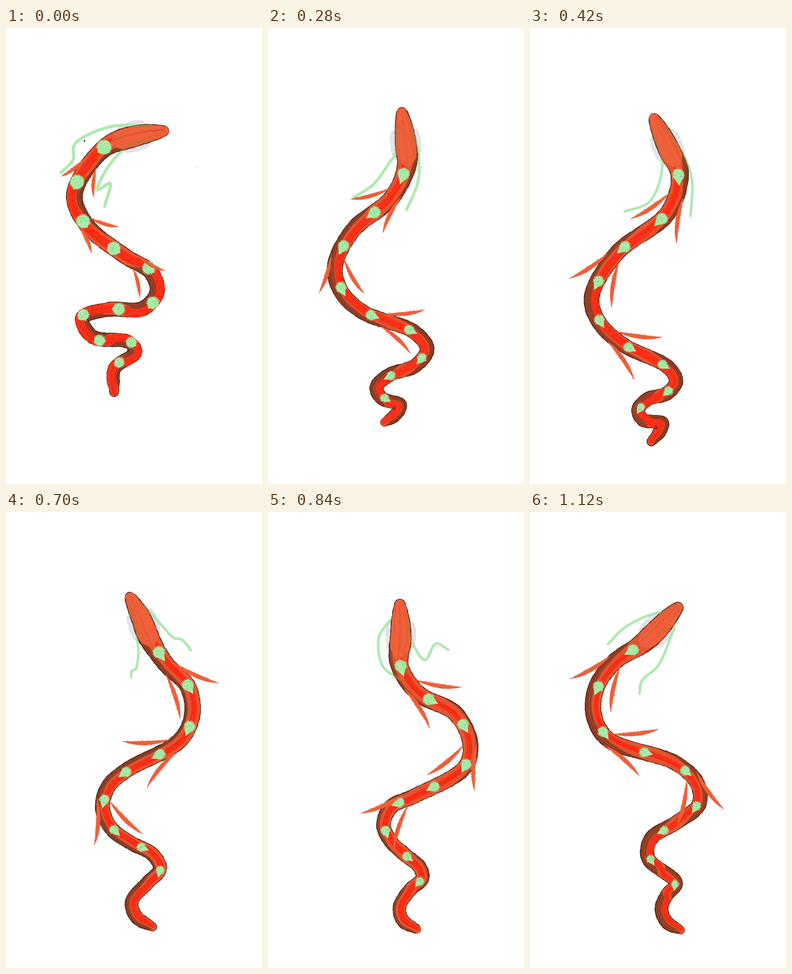
These frames come from a looping animation (561 by 998 pixels, 1.26 s). An HTML page with a canvas:

```html
<!DOCTYPE html>
<html lang="en">
<head>
<meta charset="utf-8">
<title>Swimming dragon</title>
<style>
html, body { margin: 0; width: 100%; height: 100%; overflow: hidden; background: #fff; }
canvas { display: block; width: 100vw; height: 100vh; }
</style>
</head>
<body>
<canvas id="stage" width="561" height="998"></canvas>
<script>
const W = 561, H = 998, HOLD = 140, GRAIN = 3, TAU = Math.PI * 2;
const RED = '#ff2b14', SKIN = '#e6552f', HEAD = '#f05f39', BROWN = '#8d3a20', DARK = '#2b110a';
const MINT = '#a9edaa', GILL = '#e3e4ea', OLIVE = '#a87a3c';

let seed = 1;
const rnd = () => (seed = (seed * 16807) % 2147483647) / 2147483647;
const jit = a => (rnd() * 2 - 1) * a;
const clamp = (v, lo, hi) => Math.max(lo, Math.min(hi, v));
const lerp = (a, b, k) => Array.isArray(a) ? a.map((v, i) => lerp(v, b[i], k)) : a + (b - a) * k;
const pairs = flat => Array.from({ length: flat.length / 2 }, (_, i) => flat.slice(2 * i, 2 * i + 2));
const dist = (a, b) => Math.hypot(a[0] - b[0], a[1] - b[1]);

// Centripetal Catmull-Rom through the key points.
function spline(keys, steps = 40) {
  const n = keys.length, out = [];
  const pts = [lerp(keys[1], keys[0], 2), ...keys, lerp(keys[n - 2], keys[n - 1], 2)];
  for (let i = 0; i < n - 1; i++) {
    const [a, b, c, d] = pts.slice(i, i + 4);
    const p = Math.sqrt(dist(a, b)), q = p + Math.sqrt(dist(b, c)), r = q + Math.sqrt(dist(c, d));
    for (let j = 0; j < steps; j++) {
      const t = p + (q - p) * j / steps;
      const e = lerp(a, b, t / p), f = lerp(b, c, (t - p) / (q - p)), g = lerp(c, d, (t - q) / (r - q));
      out.push(lerp(lerp(e, f, t / q), lerp(f, g, (t - p) / (r - p)), (t - p) / (q - p)));
    }
  }
  return [...out, keys[n - 1]];
}

// Points at equal distances along a curve.
function even(curve, count) {
  const run = [0];
  for (let i = 1; i < curve.length; i++) run.push(run[i - 1] + dist(curve[i - 1], curve[i]));
  const total = run[run.length - 1];
  count = count || Math.round(total / GRAIN);
  let i = 1;
  return Array.from({ length: count + 1 }, (_, k) => {
    const d = total * k / count;
    while (i < run.length - 1 && run[i] < d) i++;
    return lerp(curve[i - 1], curve[i], (d - run[i - 1]) / (run[i] - run[i - 1]));
  });
}

function girth(d, total) {
  const tip = Math.min(1, .5 + .5 * Math.sqrt(d / 40));
  const tail = Math.min(1, .7 + .3 * (total - d) / 25);
  return (19 - 5 * d / total + 5 * Math.exp(-(((d - 85) / 45) ** 2))) * tip * tail;
}

// Shade is the depth of the dark band; its sign picks the side, by the bend of the body.
function trace({ spine, bend, side }) {
  const pts = even(spline(spine)), last = pts.length - 1;
  const dir = (k, reach) => {
    const a = pts[clamp(k - reach, 0, last)], b = pts[clamp(k + reach, 0, last)];
    return Math.atan2(b[1] - a[1], b[0] - a[0]);
  };
  return pts.map(([x, y], k) => {
    const d = k * GRAIN, angle = dir(k, 3);
    const turn = Math.sin(dir(clamp(k + 12, 0, last), 4) - dir(clamp(k - 12, 0, last), 4));
    const shade = clamp(side + bend * clamp(turn * 1.3, -1, 1), -.65, .65) * clamp((d - 40) / 60, 0, 1);
    return { x, y, d, angle, shade, stripe: -.9 * shade, w: girth(d, last * GRAIN),
      nx: -Math.sin(angle), ny: Math.cos(angle) };
  });
}
const at = (p, off) => [p.x + p.nx * p.w * off, p.y + p.ny * p.w * off];
const along = (s, d) => s[clamp(Math.round(d / GRAIN), 0, s.length - 1)];

function pose(spine, whiskers, look) {
  return {
    bend: -.45, side: .08, stripe: .36, gap: 200, fin: 104, spots: 9, reach: .87, size: 13, tail: 1.9, hair: 5, specks: [],
    ...look, spine: pairs(spine), whiskers: whiskers.map(pairs)
  };
}

// In-between pose: keys blended, the head lifted, the tail left in place.
function between(a, b, k, rise, spine) {
  const up = (p, amount) => [p[0], p[1] - amount];
  const mid = spine ? pairs(spine)
    : lerp(a.spine, b.spine, k).map((p, i, all) => up(p, rise * (1 - i / all.length) ** 2));
  const whiskers = a.whiskers.map((w, i) =>
    lerp(even(spline(w), 8), even(spline(b.whiskers[i]), 8), k).map(p => up(p, rise * .7)));
  const look = {};
  for (const key of ['bend', 'side', 'stripe', 'gap', 'fin', 'reach', 'size', 'hair']) look[key] = lerp(a[key], b[key], k);
  return { ...b, ...look, spine: mid, whiskers };
}

const right = pose(
  [348,225, 285,236, 220,260, 162,330, 150,375, 180,435, 262,500, 318,535, 331,578, 300,614,
    225,616, 167,635, 190,676, 268,687, 284,709, 238,745, 237,797],
  [[225,217, 150,255, 147,288, 120,317], [270,258, 225,302, 201,354, 228,340, 216,391]],
  { bend: .45, side: .05, stripe: .55, gap: 145, fin: 66, spots: 11, reach: .93, size: 16, tail: 1.2, hair: 6,
    specks: [[172, 247, 1.8], [418, 304, .6]] });

const upRight = pose(
  [327,199, 297,252, 268,300, 225,345, 180,387, 164,440, 175,492, 215,527, 345,558, 392,605,
    355,655, 280,683, 238,715, 252,741, 290,768, 270,793, 240,800],
  [[262,267, 195,300, 155,351], [312,270, 285,348, 231,403]],
  { stripe: .42, gap: 180, fin: 68, spots: 10, reach: .95, hair: 6.5 });

const upLeft = pose(
  [271,196, 304,265, 328,320, 302,405, 190,493, 135,590, 152,645, 205,694, 302,742, 320,773,
    300,800, 258,812, 237,836, 248,858, 290,865, 283,885, 266,905],
  [[290,300, 262,380, 207,402], [342,290, 355,335, 352,412]],
  { stripe: .46 });

const left = pose(
  [253,212, 300,228, 340,252, 372,298, 387,350, 373,405, 330,460, 207,525, 178,570, 170,622,
    193,673, 250,706, 310,726, 337,763, 310,797, 263,842, 275,878, 316,903],
  [[328,270, 333,345, 310,376, 278,364, 259,387], [335,214, 385,252, 414,333]],
  { bend: 0, side: .5, reach: .79 });

const up = pose(
  [289,200, 291,272, 288,335, 330,398, 410,440, 443,505, 432,558, 320,622, 270,645, 253,685,
    270,722, 300,750, 333,778, 338,803, 312,826, 288,865, 296,895, 326,913],
  [[243,275, 252,338, 290,367], [310,270, 344,324, 368,288, 396,302]],
  { bend: -.2, side: .04, reach: .85 });

const turn = pose(
  [326,207, 250,285, 185,328, 145,385, 140,445, 170,497, 320,550, 367,595, 370,640, 320,680,
    265,715, 259,758, 320,812, 300,838, 288,868, 300,898, 330,915],
  [[250,230, 205,255, 170,290], [308,275, 280,337, 245,370, 240,398]],
  { size: 12, stripe: .32 });

const swing = [312,190, 270,270, 222,325, 205,385, 240,435, 385,510, 430,560, 410,610,
  275,668, 252,705, 275,745, 332,803, 308,832, 286,868, 298,897, 328,914];

const cycle = [
  right, upRight, between(upRight, upLeft, .6, 14), upLeft,
  left, between(left, up, .5, 21), up,
  between(up, turn, .5, 10, swing), turn
];

function sheet() {
  const c = document.createElement('canvas');
  c.width = W; c.height = H;
  const g = c.getContext('2d');
  g.lineCap = g.lineJoin = 'round';
  return g;
}
function disc(g, x, y, r) {
  g.beginPath();
  g.arc(x, y, Math.max(0, r), 0, TAU);
  g.fill();
}
function path(g, pts) {
  g.beginPath();
  pts.forEach(([x, y]) => g.lineTo(x, y));
  g.stroke();
}
function ribbon(g, s, color, off, size) {
  g.fillStyle = color;
  for (const p of s) disc(g, ...at(p, off(p)), size(p));
}
// One brush hair along the body, drawn segment by segment.
function bristle(g, s, off, width, chance = 1) {
  for (let k = 1; k < s.length; k++) {
    const o = off(s[k]);
    if (o === null || rnd() > chance) continue;
    g.lineWidth = width(s[k]);
    path(g, [at(s[k - 1], o), at(s[k], o)]);
  }
}

function body(s, p, hairs) {
  const g = sheet(), rows = 12;
  ribbon(g, s, DARK, () => 0, q => q.w + .2 + jit(.5));
  ribbon(g, s, SKIN, () => 0, q => q.w - .7);
  g.globalCompositeOperation = 'source-atop';

  for (let j = 0; j < rows; j++) {
    g.strokeStyle = j === 0 ? DARK : j % 4 === 1 ? '#5e2415' : BROWN;
    g.globalAlpha = .7 - .4 * j / rows;
    bristle(g, s, q => {
      const depth = Math.abs(q.shade);
      return depth < .06 ? null : Math.sign(q.shade) * (1 - 2 * depth * j / rows);
    }, q => 1 + 2 * q.w * Math.abs(q.shade) / rows);
  }
  g.globalAlpha = 1;
  ribbon(g, s, RED, q => q.stripe, q => q.w * p.stripe * (.8 + q.d / 2000) * clamp((q.d - 90) / 40, 0, 1));
  ribbon(g, s, HEAD, () => 0, q => q.w * .9 * clamp((125 - q.d) / 30, 0, 1));

  for (let j = 0; j < 10; j++) {
    const o = jit(.9);
    g.globalAlpha = .1 + rnd() * .14;
    g.strokeStyle = j % 3 ? '#7a2a16' : '#ff7048';
    bristle(g, s, () => o, () => .8 + rnd() * .5, .8);
  }
  g.strokeStyle = DARK;
  g.globalAlpha = .5;
  for (const edge of [-1, 1]) bristle(g, s, () => edge * .98, () => .5 + rnd() * 1.5, .65);

  g.globalAlpha = .6;
  g.strokeStyle = OLIVE;
  g.lineWidth = p.hair;
  hairs.forEach(h => path(g, h));

  g.globalCompositeOperation = 'source-over';
  g.globalAlpha = .8;
  g.fillStyle = DARK;
  for (const q of s) for (const edge of [-1, 1]) {
    if (rnd() < .4) g.fillRect(...at(q, edge * (1 + rnd() * 1.2 / q.w)), 1, 1);
  }
  return g.canvas;
}

function gill(g, q, side) {
  g.save();
  g.translate(...at(q, side * 1.1));
  g.rotate(q.angle);
  g.fillStyle = GILL;
  g.beginPath();
  g.ellipse(0, 0, 29, 8, 0, 0, TAU);
  g.fill();
  g.fillStyle = '#b4b5bd';
  for (let i = 0; i < 45; i++) {
    const a = rnd() * TAU;
    g.fillRect(Math.cos(a) * 29 + jit(1), Math.sin(a) * 8 + jit(1), 1, 1);
  }
  g.restore();
}

function whisker(g, pts, width) {
  g.strokeStyle = '#718f72';
  g.lineWidth = width + .8;
  g.lineCap = 'butt';
  g.setLineDash([1, 2]);
  path(g, pts);
  g.setLineDash([]);
  g.lineCap = 'round';
  g.strokeStyle = MINT;
  g.lineWidth = width - .6;
  path(g, pts);
}

// Fins sweep back from the body, spread to both sides of its direction.
function fin(g, s, d, side, len) {
  const q = along(s, d), [x, y] = at(q, side * .85);
  const a = along(s, d + 40).angle + side * .42;
  g.save();
  g.translate(x, y);
  g.rotate(a);
  g.scale(1, side);
  const fat = 5 + len * .04, sag = -len * .1;
  g.fillStyle = HEAD;
  g.beginPath();
  g.moveTo(0, 0);
  g.quadraticCurveTo(len * .55, sag - fat, len, 0);
  g.quadraticCurveTo(len * .55, sag + fat, 0, 0);
  g.fill();
  for (let i = 0; i < len * .7; i++) {
    const t = rnd(), edge = (rnd() < .5 ? -1 : 1) * (1 + rnd() * .2);
    g.fillStyle = rnd() < .25 ? '#8a3a26' : HEAD;
    g.fillRect(len * t, 2 * t * (1 - t) * (sag + fat * edge), 1, 1);
  }
  g.restore();
}

function spot(g, q, r, tail) {
  g.save();
  g.translate(...at(q, q.stripe * .5));
  g.rotate(q.angle);
  g.fillStyle = MINT;
  disc(g, 0, 0, r - .8);
  g.beginPath();
  g.moveTo(r * .3, r * .85);
  g.lineTo(r * tail, 0);
  g.lineTo(r * .3, -r * .85);
  g.fill();
  for (let i = 0; i < r * 9; i++) {
    const a = rnd() * TAU, rim = i % 3, d = rim ? r + jit(1.3) : r * Math.sqrt(rnd());
    g.fillStyle = rim ? MINT : rnd() < .5 ? '#67a865' : '#88cf86';
    g.fillRect(Math.cos(a) * d - .5, Math.sin(a) * d - .5, 1.1, 1.1);
  }
  g.restore();
}

function paint(p, i) {
  seed = 811 + i * 97;
  const g = sheet(), s = trace(p), total = s.length * GRAIN, first = 138;
  const hairs = p.whiskers.map((w, j) => spline([at(along(s, 28), j ? -.85 : .85), ...w]));
  g.fillStyle = '#fff';
  g.fillRect(0, 0, W, H);
  for (const side of [1, -1]) gill(g, along(s, 68), side);
  hairs.forEach(h => whisker(g, h, p.hair));
  g.drawImage(body(s, p, hairs), 0, 0);
  for (let j = 0; j < p.spots; j++) {
    const t = j / (p.spots - 1), d = lerp(first, total * p.reach, t + .2 * t * (1 - t));
    spot(g, along(s, d), p.size * (1 - .3 * t), p.tail);
  }
  for (let j = 0; j < 3; j++) for (const side of [1, -1]) fin(g, s, 182 + j * p.gap, side, p.fin);
  g.fillStyle = '#111';
  p.specks.forEach(v => disc(g, ...v));
  return g.canvas;
}

const cels = cycle.map(paint);
const stage = document.getElementById('stage').getContext('2d');
function tick() {
  stage.drawImage(cels[Math.floor(performance.now() / HOLD) % cels.length], 0, 0);
  requestAnimationFrame(tick);
}
tick();
</script>
</body>
</html>
```
